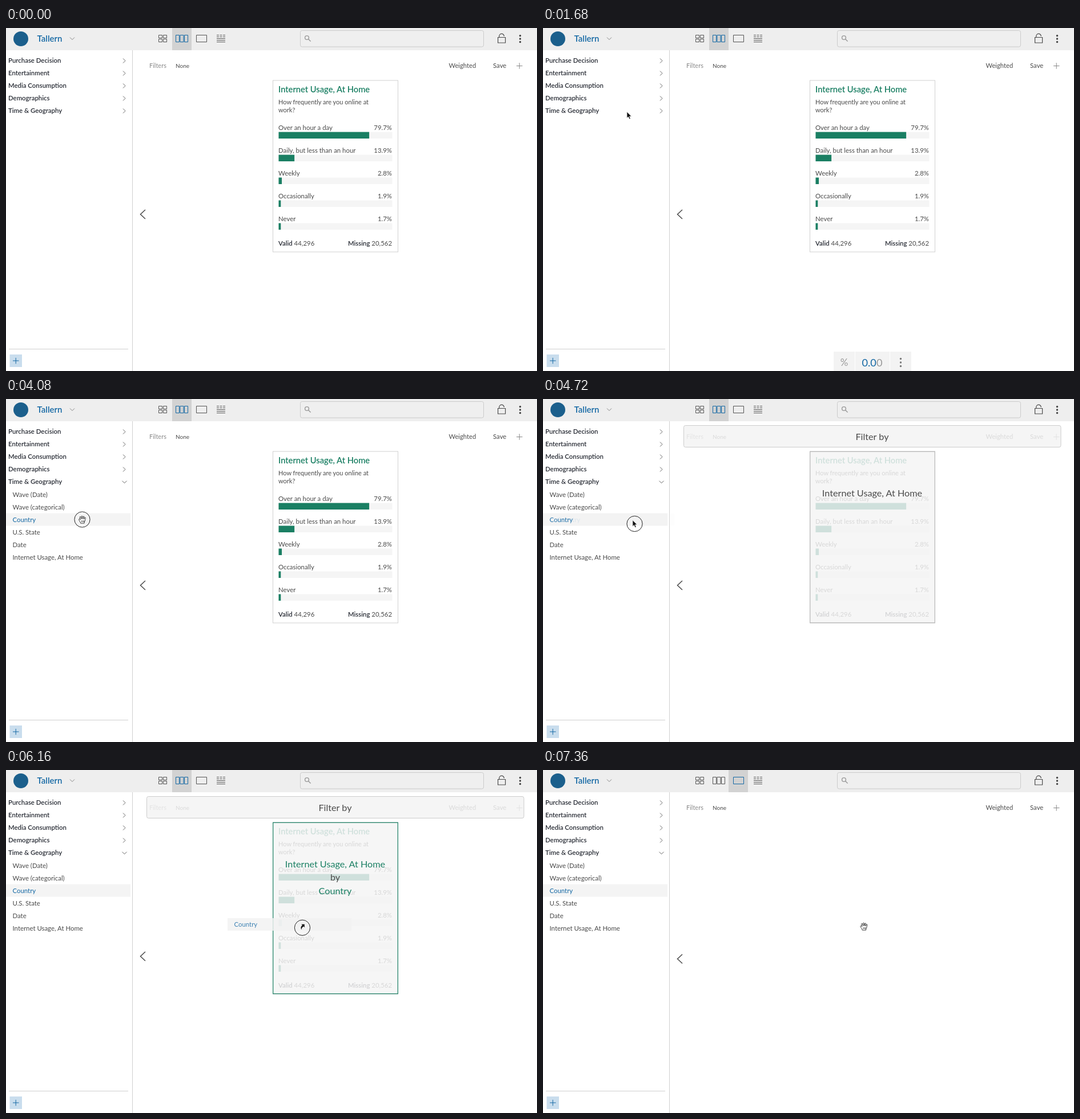
Recreate the animation shown at these times as an HTML page. Size 930x602 px, loop 8000 ms.

```html
<!DOCTYPE html>
<html lang="en">
<head>
<meta charset="utf-8">
<title>Drag a variable onto a card</title>
<style>
  html, body { margin: 0; width: 100%; height: 100%; overflow: hidden; background: #fff; }
  svg { display: block; width: 100vw; height: 100vh; }
  text { font: 11.4px Lato, "Open Sans", sans-serif; fill: #4a4a4a; white-space: pre; }
  .bold { font-weight: 600; fill: #262a33; }
  .line { fill: none; stroke: #4a4a4a; }
  .blue { fill: #1468a4; }
  .green { fill: #1a7f63; }
  .mid { text-anchor: middle; }
  .end { text-anchor: end; }
  .big { font-size: 16.2px; }
  .tab .line { stroke: #555; }
  .tab rect.bg { fill: none; }
  .tab.on .line { stroke: #1468a4; }
  .tab.on rect.bg { fill: #d2d2d2; }
  .row rect { fill: none; }
  .row.on rect { fill: #f4f4f4; }
  .row.on text { fill: #1468a4; }
  #drop rect { fill: #f4f4f4; fill-opacity: .83; stroke: #b8b8b8; stroke-width: 1.2; }
  #drop .extra { visibility: hidden; }
  #drop.over rect { stroke: #1a7f63; }
  #drop.over .name { fill: #1a7f63; }
  #drop.over .extra { visibility: visible; }
  .pointer { fill: #111; stroke: #fff; stroke-width: .8; }
</style>
</head>
<body>
<svg viewBox="0 0 930 602" preserveAspectRatio="none">
  <rect width="930" height="602" fill="#fff"/>

  <g id="header">
    <rect width="930" height="39" fill="#eee"/>
    <circle cx="26" cy="19" r="13" fill="#1b5f8c"/>
    <text class="bold" x="54.5" y="24" style="font-size:15px;fill:#1468a4">Tallern</text>
    <path class="line" d="M112 16.5l4 4 4-4" style="stroke:#888"/>
    <g class="tab" transform="translate(257)">
      <rect class="bg" width="34" height="39"/>
      <path class="line" d="M10.5 12.5h6v5h-6zM18.5 12.5h6v5h-6zM10.5 19.5h6v5h-6zM18.5 19.5h6v5h-6z"/>
    </g>
    <g class="tab" id="columns" transform="translate(291)">
      <rect class="bg" width="34" height="39"/>
      <path class="line" d="M6.5 12.5h6v12h-6zM14 12.5h6v12h-6zM21.5 12.5h6v12h-6z"/>
    </g>
    <g class="tab" id="single" transform="translate(325)">
      <rect class="bg" width="34" height="39"/>
      <path class="line" d="M8.5 12.5h18v12h-18z"/>
    </g>
    <g class="tab" transform="translate(359)">
      <rect class="bg" width="34" height="39"/>
      <path class="line" stroke-dasharray="4 1.5" d="M10 12.5h15M10 15.5h15"/>
      <path class="line" d="M10 18.5h15M10 21.5h15M10 24.5h15"/>
    </g>
    <rect x="515.5" y="4.5" width="321" height="28.5" rx="3" fill="#efefef" stroke="#cbcbcb"/>
    <g class="line" style="stroke:#999" stroke-width="1.4">
      <circle cx="527" cy="17" r="3.4"/><path d="M529.6 19.6l4 4"/>
    </g>
    <path class="line" stroke-width="1.2" d="M861.6 16.5h13v9.5h-13zM863.8 16.5v-2a4.3 4.3 0 0 1 8.6 0"/>
    <g fill="#444"><circle cx="900.5" cy="13.5" r="1.7"/><circle cx="900.5" cy="19" r="1.7"/><circle cx="900.5" cy="24.5" r="1.7"/></g>
  </g>

  <g id="sidebar">
    <path class="line" style="stroke:#d0d0d0" d="M221.5 39v563M5 563.5h209"/>
    <rect x="6.5" y="573" width="21.5" height="22" fill="#c9dded"/>
    <path class="line" style="stroke:#1468a4" d="M12 584h10.5M17.2 578.8v10.5"/>
    <g id="groups"></g>
    <g id="items"></g>
  </g>

  <text x="251" y="70.2" style="font-size:11px;fill:#8a8a8a">Filters</text>
  <text x="297" y="69.7" style="font-size:10px">None</text>
  <text x="775.5" y="70.2" style="font-size:11.2px">Weighted</text>
  <text x="853" y="70.2">Save</text>
  <path class="line" style="stroke:#888" d="M894 66.5h10.5M899.2 61.2v10.5"/>
  <path class="line" id="back" stroke-width="1.5" d="M244 319l-8.5 8 8.5 8"/>

  <g id="card">
    <rect x="467.5" y="92" width="219" height="301" fill="#fff" stroke="#d0d0d0"/>
    <text class="bold" x="477" y="113.3" style="font-size:14.7px;fill:#1a7f63">Internet Usage, At Home</text>
    <text x="477" y="134" style="font-size:11px">How frequently are you online at</text>
    <text x="477" y="147.8" style="font-size:11px">work?</text>
    <g id="bars"></g>
    <text x="477" y="381.5"><tspan class="bold">Valid</tspan> 44,296</text>
    <text class="end" x="676" y="381.5"><tspan class="bold">Missing</tspan> 20,562</text>
  </g>

  <g id="targets">
    <g id="filter">
      <rect x="246.5" y="46.5" width="660.5" height="38" rx="3" fill="#f4f4f4" fill-opacity=".85" stroke="#ccc"/>
      <text class="mid big" x="576.5" y="72">Filter by</text>
    </g>
    <g id="drop">
      <rect x="467.7" y="92.3" width="218.6" height="300.4"/>
      <text class="mid big name" x="576.5" y="170.7">Internet Usage, At Home</text>
      <text class="mid big extra" x="576.5" y="194">by</text>
      <text class="mid big name extra" x="576.5" y="217.7">Country</text>
    </g>
  </g>

  <g id="tools">
    <path fill="#f3f3f3" d="M509 568h37v34h-37zM547 568h60v34h-60zM608 568h37v34h-37z"/>
    <text class="mid" x="527.5" y="593" style="font-size:17px;fill:#999">%</text>
    <text x="558.5" y="594.3" style="font-size:18.2px;fill:#1468a4">0.0<tspan fill="#999">0</tspan></text>
    <g fill="#777"><circle cx="626.5" cy="580.5" r="1.7"/><circle cx="626.5" cy="587" r="1.7"/><circle cx="626.5" cy="593.5" r="1.7"/></g>
  </g>

  <g id="ghost">
    <rect width="217" height="22" fill="#f2f2f2"/>
    <text x="11.5" y="15" style="fill:#1468a4">Country</text>
  </g>

  <g id="cursor">
    <circle id="ring" r="13.6" fill="none" stroke="#222"/>
    <path id="arrow" class="pointer" d="M-3.6-6.5V4.7L-1.1 2.4 .8 6.6 2.8 5.7 1 1.7H4.5Z"/>
    <path id="alias" class="pointer" d="M-2.5-6.5H4.2V.3L2-1.9C-.6-.2-1.3 1.8-.8 4.3-4 1.8-3.5-1.8-.4-4.3Z"/>
    <path id="hand" fill="#fff" stroke="#222" stroke-width=".9" stroke-linejoin="round"
      d="M-2.8 6.5C-3 4.5-5.8 1.5-6 0-6-1.6-4.4-1.3-3.2.4L-4.3-3.6C-4.6-5.4-2.8-5.6-2.2-4L-1.2-1-1.5-5C-1.5-6.7.4-6.7.6-5L.9-1 1.6-4.7C2-6.3 3.6-5.9 3.4-4.3L3-.6 4.2-3C5-4.3 6.3-3.6 5.8-2.2 4.8.8 5.4 2.4 3.6 4.5V6.5ZM-1 1.8v2.6M1.1 1.8v2.6M3 1.8v2.6"/>
  </g>
</svg>

<script>
const LOOP = 8000, STEP = 80;
const $ = id => document.getElementById(id);
const show = (id, opacity) => $(id).setAttribute('opacity', Number(opacity));
const move = (id, x, y) => $(id).setAttribute('transform', `translate(${x} ${y})`);
const clamp = v => Math.max(0, Math.min(1, v));

const groups = ['Purchase Decision', 'Entertainment', 'Media Consumption', 'Demographics', 'Time &amp; Geography'];
const items = ['Wave (Date)', 'Wave (categorical)', 'Country', 'U.S. State', 'Date', 'Internet Usage, At Home'];
const answers = [['Over an hour a day', 79.7], ['Daily, but less than an hour', 13.9],
  ['Weekly', 2.8], ['Occasionally', 1.9], ['Never', 1.7]];

$('groups').innerHTML = groups.map((name, i) => `<g transform="translate(0 ${57.5 + 22 * i})">
  <text class="bold" x="4" y="3.8">${name}</text>
  <path class="line chevron" d="M205-4l4 4-4 4" style="stroke:#666"/></g>`).join('');
$('items').innerHTML = items.map((name, i) => `<g class="row" transform="translate(0 ${156.5 + 22 * i})">
  <rect width="218" height="22"/><text x="11.5" y="15">${name}</text></g>`).join('');
$('bars').innerHTML = answers.map(([name, pct], i) => `<g transform="translate(477 ${182.5 + 40 * i})">
  <text y="-4">${name}</text><text class="end" x="199" y="-4">${pct}%</text>
  <rect x=".5" width="199" height="11.5" fill="#f5f5f5"/>
  <rect class="green" x=".5" width="${Math.max(3.8, pct * 1.99)}" height="11.5"/></g>`).join('');

const chevron = document.querySelectorAll('.chevron')[4];
const rows = [...document.querySelectorAll('.row')];

// keys: [time, x, y]
const cursorPath = [[2720, 150.5, 153.5], [3040, 139, 176], [3600, 133.5, 211.5], [4719, 133.5, 211.5],
  [4720, 160.5, 219], [5440, 374.5, 248.5], [5520, 397, 251.5], [6160, 519, 276.8], [6400, 550, 277],
  [6800, 559, 281], [7279, 559, 281], [7280, 562, 274.5]];
const ghostPath = [[4720, 13, 200.5], [5440, 234.5, 231.5], [5520, 260, 234.5], [6160, 388, 260],
  [6400, 423, 261], [6800, 428, 264.5]];

function along(path, t) {
  const next = path.findIndex(key => key[0] > t);
  if (next < 0) return path[path.length - 1].slice(1);
  if (next === 0) return path[0].slice(1);
  const a = path[next - 1], b = path[next], k = (t - a[0]) / (b[0] - a[0]);
  return [a[1] + (b[1] - a[1]) * k, a[2] + (b[2] - a[2]) * k];
}

function cursorAt(t) {
  if (t >= 1520) return along(cursorPath, t);
  const left = (1 - clamp((t - 560) / 880)) ** 2;
  return [150 + 330 * left, 157 + 223 * left];
}

function draw(t) {
  const [x, y] = cursorAt(t);
  const open = t >= 2160, dragging = t >= 4720 && t < 7280, dropped = t >= 7360;
  const over = dragging && x > 468;
  const shape = over ? 'alias' : t >= 7280 || (t >= 2800 && t < 4720 && y > 162) ? 'hand' : 'arrow';

  show('cursor', t >= 640);
  move('cursor', x, y);
  for (const id of ['arrow', 'alias', 'hand']) show(id, id === shape);
  show('ring', t >= 1520 && t < 1680 || t >= 4080 && t < 7280);

  show('tools', t < 2160 ? clamp((t - 560) / 320) : clamp((2480 - t) / 400));
  show('items', open);
  chevron.setAttribute('d', open ? 'M203.5-1.8l4 4 4-4' : 'M205-4l4 4-4 4');
  const hovered = t < 2800 ? -1 : Math.min(2, Math.floor((y - 156.5) / 22));
  const current = t >= 3600 ? 2 : hovered;
  rows.forEach((row, i) => row.classList.toggle('on', i === current));

  show('targets', dragging);
  $('drop').classList.toggle('over', over);
  show('ghost', dragging && Math.min(.82, .1 + (t - 4720) / 200));
  move('ghost', ...along(ghostPath, t));

  show('card', !dropped);
  move('back', 0, dropped ? 4.5 : 0);
  $('columns').classList.toggle('on', !dropped);
  $('single').classList.toggle('on', dropped);
}

const start = performance.now();
function tick() {
  const t = (performance.now() - start) % LOOP;
  draw(Math.floor(t / STEP) * STEP);
  requestAnimationFrame(tick);
}
tick();
</script>
</body>
</html>
```
